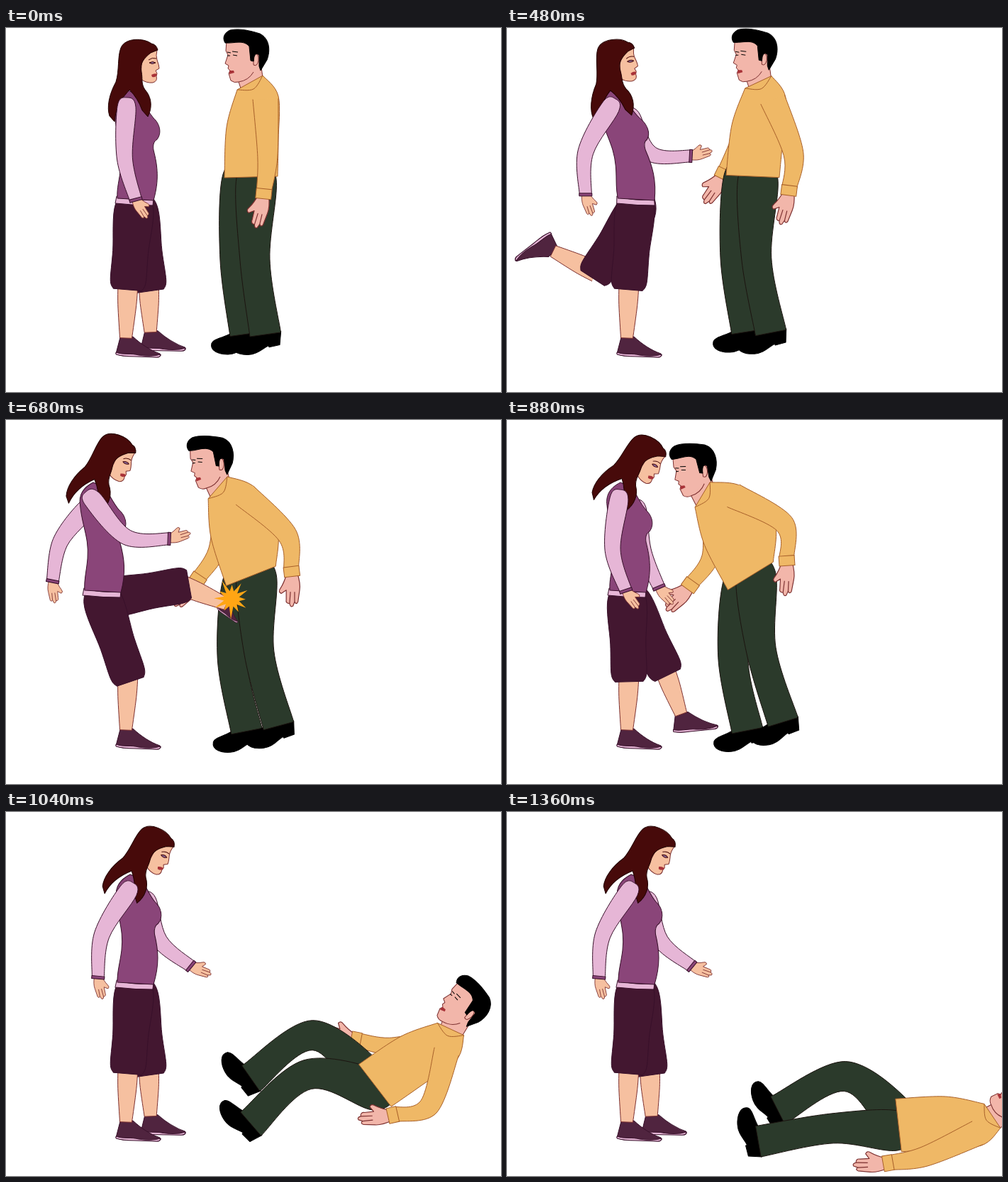
Animation of 698x513 px, one loop 1.56 s. Source, as an HTML page with a canvas:

```html
<!DOCTYPE html>
<html lang="en">
<head>
<meta charset="utf-8">
<title>Kick</title>
<style>
html, body { margin: 0; width: 100%; height: 100%; overflow: hidden; background: #fff; }
canvas { display: block; width: 698px; height: 513px; }
</style>
</head>
<body>
<canvas id="stage" width="698" height="513"></canvas>
<script>
const ctx = document.getElementById('stage').getContext('2d');
const LOOP = 1560, STEP = 40;

const C = {
  hair: '#470a0a', wSkin: '#f6c0a0', top: '#8a4579', sleeve: '#e6b6d6', shorts: '#431730',
  wShoe: '#50243f', wLine: '#38102a', skinLine: '#7c3030',
  mSkin: '#f2b6aa', sweater: '#efb866', seam: '#a8602a', trousers: '#2b3a2b', mLine: '#1c1410',
  black: '#000', lips: '#a83238', star: '#ffa514'
};

// Angles are in degrees, clockwise from the right, and may pass 180.
const WOMAN = {
  stand: { shift: 0, lean: 0, tilt: 0, twist: 13, near: [92, 75], far: [85, 93], leg: [82, 88], foot: [25, 1] },
  recoil: { shift: 0, lean: -.18, tilt: -6, twist: 28, near: [119, 90], far: [61, 3], leg: [123, 206], foot: [166, 1] },
  kick: { shift: -46, lean: -.02, tilt: 22, twist: -8, near: [48, 2], far: [128, 101], leg: [-10, 23], foot: [58, .55] },
  step: { shift: -12, lean: 0, tilt: 28, twist: 25, near: [97, 72], far: [81, 67], leg: [64, 70], foot: [18, 1] },
  fall: { shift: 0, lean: .02, tilt: 25, twist: 26, near: [121, 95], far: [72, 39], leg: [82, 88], foot: [25, 1] }
};
WOMAN.rest = WOMAN.fall;

const MAN = {
  stand: { hip: [345, 210], lean: 0, tilt: 0, near: [88, 96], far: [90, 90], nearLeg: [91, 82], farLeg: [95, 82] },
  recoil: { hip: [346, 209], lean: 4, tilt: 0, near: [69, 97], far: [112, 116], nearLeg: [91, 79], farLeg: [96, 81] },
  kick: { hip: [345, 220], lean: -20, tilt: -6, near: [43, 83], far: [99, 124], nearLeg: [88, 75], farLeg: [98, 79] },
  step: { hip: [343, 220], lean: -30, tilt: -9, near: [29, 86], far: [92, 126], nearLeg: [86, 73], farLeg: [98, 79] },
  fall: { hip: [520, 385], lean: 54, tilt: 39, near: [108, 167], far: [172, 191], nearLeg: [193, 139], farLeg: [218, 145] },
  rest: { hip: [552, 441], lean: 85, tilt: 80, near: [156, 170], far: [170, 180], nearLeg: [182, 170], farLeg: [218, 153] }
};

const linear = u => u;
const easeIn = u => u ** 1.4;
const easeOut = u => 1 - (1 - u) ** 2.2;
// Time of arrival, pose, and the easing that leads to it.
const TIMELINE = [
  [120, 'stand', linear], [480, 'recoil', easeOut], [680, 'kick', easeIn],
  [880, 'step', linear], [1040, 'fall', linear], [1360, 'rest', easeOut]
];

const path = d => new Path2D(d);
const HAND = path('M-3-6C6-9 12-10 18-9L32-7Q36-5 32-3L37-1Q39 2 34 3Q34 8 29 7L18 7L22 13Q20 17 16 14C10 10 4 8-3 6Z');
const FINGERS = path('M20-3L32-3M20 2L34 3');
const W_SHOE = path('M-8-1L-14 22Q-5 27 12 25L46 27Q51 25 48 22C34 17 22 9 10-2Z');
const W_SOLE = path('M-14 20C-4 24 8 21 18 24Q36 27 49 23Q49 28 40 27L12 26Q-4 26-14 23Z');
const M_SHOE = path('M-18-3C-28 4-45 5-48 12C-51 23-38 28-25 28C-12 28-5 20 4 16L5 18L20 15L22-4Z');
const W_TOP = path('M172 88C158 95 151 105 153 120C155 150 165 165 162 195C160 215 156 225 157 240L208 243C216 215 214 195 208 172C207 165 208 160 213 157C220 148 217 135 208 127C200 118 195 105 188 95Z');
const W_HEM = path('M156 237Q182 245 208 241L207 250Q180 250 154 247Z');

const WOMAN_HEAD = [
  [path('M192 36L213 31Q211 39 213 45Q216 53 216 57L211 60L213 64L212 68Q214 75 207 77Q198 78 190 72Z'), C.wSkin, C.skinLine],
  [path('M205 22C195 14 168 13 162 28C157 40 160 60 155 76C145 94 142 112 146 124L153 132Q154 108 174 87Q186 99 192 116L200 125C207 111 205 97 196 87C190 78 193 72 191 62C188 50 195 42 204 35L214 31Q212 23 205 22Z'), C.hair, '#200000'],
  [path('M201 45Q206 41 212 43'), null, C.hair],
  [path('M202 49Q207 46 211 49Q206 52 202 49Z'), '#8a6a9c', C.hair],
  [path('M205 66Q210 63 213 65Q212 70 206 69Z'), C.lips, null]
];
const MAN_HEAD = [
  [path('M311 18L310 32L313 38L309 50L314 53L313 57L316 60L314 64L317 74Q322 78 328 76L335 97L365 92L358 40L344 15Z'), C.mSkin, C.skinLine],
  [path('M328 76Q342 74 349 62'), null, C.skinLine],
  [path('M349 37Q357 34 356 46Q354 55 349 52Z'), C.mSkin, C.skinLine],
  [path('M309 21C304 13 309 6 316 3C330 0 345 4 358 8C372 15 373 32 368 45L359 60L357 54L357 38Q350 32 349 47L345 46L343 26C335 16 322 22 309 21Z'), C.black, C.black],
  [path('M312 34L317 35M319 33L327 34M312 39L316 39M320 38L326 39'), null, C.black],
  [path('M315 60L321 60L322 63L315 65Z'), C.lips, null]
];

const rad = deg => deg * Math.PI / 180;
const polar = ([x, y], len, deg) => [x + len * Math.cos(rad(deg)), y + len * Math.sin(rad(deg))];
const along = (a, b, u) => [a[0] + (b[0] - a[0]) * u, a[1] + (b[1] - a[1]) * u];

// Blends numbers, or every entry of two poses of the same form.
function mix(a, b, u) {
  if (typeof a === 'number') return a + (b - a) * u;
  if (Array.isArray(a)) return a.map((v, i) => mix(v, b[i], u));
  return Object.fromEntries(Object.keys(a).map(k => [k, mix(a[k], b[k], u)]));
}

function poseAt(poses, t) {
  const next = TIMELINE.findIndex(key => key[0] > t);
  if (next === 0) return poses.stand;
  if (next < 0) return poses.rest;
  const [from, a] = TIMELINE[next - 1], [to, b, ease] = TIMELINE[next];
  return mix(poses[a], poses[b], ease((t - from) / (to - from)));
}

function paint(shape, fill, line) {
  if (fill) { ctx.fillStyle = fill; ctx.fill(shape); }
  if (line) { ctx.strokeStyle = line; ctx.stroke(shape); }
}

// Smooth runs of points, joined by straight lines with sharp corners.
function outline(runs, closed) {
  const p = new Path2D();
  for (const run of runs) {
    const get = i => run[Math.max(0, Math.min(run.length - 1, i))];
    p.lineTo(...run[0]);
    for (let i = 0; i < run.length - 1; i++) {
      const [a, b, c, d] = [get(i - 1), get(i), get(i + 1), get(i + 2)];
      p.bezierCurveTo(b[0] + (c[0] - a[0]) / 6, b[1] + (c[1] - a[1]) / 6,
        c[0] - (d[0] - b[0]) / 6, c[1] - (d[1] - b[1]) / 6, c[0], c[1]);
    }
  }
  if (closed) p.closePath();
  return p;
}

function limb(joints, widths, fill, line, cap = true) {
  const left = [], right = [];
  let top;
  joints.forEach(([x, y], i) => {
    const a = joints[i - 1] || joints[i], b = joints[i + 1] || joints[i];
    const dx = b[0] - a[0], dy = b[1] - a[1], k = widths[i] / Math.hypot(dx, dy);
    left.push([x + dy * k, y - dx * k]);
    right.unshift([x - dy * k, y + dx * k]);
    if (!i) top = [x - dx * k, y - dy * k];
  });
  paint(cap ? outline([[...right, top, ...left]], true) : outline([left, right]), fill, line);
}

function place([x, y], deg, draw, sx = 1, sy = 1) {
  ctx.save();
  ctx.translate(x, y);
  ctx.rotate(rad(deg));
  ctx.scale(sx, sy);
  draw();
  ctx.restore();
}

function head(parts, neck, deg, px, py) {
  place(neck, deg, () => {
    ctx.translate(-px, -py);
    for (const part of parts) paint(...part);
  });
}

function arm(shoulder, [upper, fore], look) {
  const elbow = polar(shoulder, look.upper, upper), wrist = polar(elbow, look.fore, fore);
  const cuff = new Path2D();
  cuff.rect(-3, -look.cuffHalf, look.cuff, look.cuffHalf * 2);
  place(polar(wrist, look.cuff - 5, fore), fore + look.bend, () => {
    paint(HAND, look.skin, C.skinLine);
    paint(FINGERS, null, C.skinLine);
  }, look.hand, look.hand * Math.sign(look.bend));
  limb([shoulder, elbow, wrist], look.widths, look.fill, look.line, look.cap);
  place(wrist, fore, () => paint(cuff, look.cuffFill, look.line));
}

const W_ARM = {
  upper: 73, fore: 61, widths: [13, 11, 8.5], cap: true, fill: C.sleeve, line: C.wLine,
  cuff: 4, cuffHalf: 9, cuffFill: C.top, skin: C.wSkin, hand: .82, bend: -16
};
const W_FAR_ARM = { ...W_ARM, upper: 60, fore: 57 };
const M_ARM = {
  upper: 82, fore: 48, widths: [18, 14, 10.5], cap: false, fill: C.sweater, line: C.seam,
  cuff: 14, cuffHalf: 11, cuffFill: C.sweater, skin: C.mSkin, hand: 1.18, bend: 7
};
const M_FAR_ARM = { ...M_ARM, upper: 58, fore: 44, widths: [14, 12, 10] };

function womanLeg(hip, knee, ankle, [turn, length]) {
  place(ankle, turn - 26, () => {
    paint(W_SHOE, C.wShoe, C.wLine);
    paint(W_SOLE, C.sleeve, C.wLine);
  }, length, length);
  limb([knee, along(knee, ankle, .4), ankle], [14, 13, 8.5], C.wSkin, C.skinLine, false);
  const thigh = [0, .6, .98, 1.09].map(u => along(hip, knee, u));
  limb(thigh, [26.5, 25, 25, 20], C.shorts, C.wLine);
}

function drawWoman(t) {
  const p = poseAt(WOMAN, t);
  const sway = (x, y) => [x + p.shift + p.lean * (243 - y), y];
  const shoulder = sway(170, 111);

  arm([shoulder[0] + p.twist, 125], p.far, W_FAR_ARM);
  const hip = [186 + p.shift, 252], knee = polar(hip, 110, p.leg[0]);
  womanLeg(hip, knee, polar(knee, 68, p.leg[1]), p.foot);
  womanLeg([181 + p.shift, 250], [172, 359], [169, 437], [26, 1]);

  ctx.save();
  ctx.transform(1, 0, -p.lean, 1, p.shift + p.lean * 243, 0);
  paint(W_HEM, C.sleeve, C.wLine);
  paint(W_TOP, C.top, C.wLine);
  ctx.restore();
  head(WOMAN_HEAD, sway(183, 85), p.tilt, 183, 85);
  arm(shoulder, p.near, W_ARM);
}

function drawMan(t) {
  const p = poseAt(MAN, t);
  const stoop = Math.max(0, -p.lean);
  const cos = Math.cos(rad(p.lean)), sin = Math.sin(rad(p.lean));
  const at = (x, y) => [p.hip[0] + x * cos - y * sin, p.hip[1] + x * sin + y * cos];
  const thigh = 115 - .27 * Math.abs(p.lean);

  const leg = (hip, [a, b]) => {
    const knee = polar(hip, thigh, a), ankle = polar(knee, 106, b);
    place(ankle, b - 83, () => paint(M_SHOE, C.black, C.black));
    limb([hip, knee, ankle], [28, 21, 22], C.trousers, C.mLine);
  };

  arm(at(-5, -100), p.far, M_FAR_ARM);
  leg(at(-12, 2), p.farLeg);
  leg(at(8, 2), p.nearLeg);
  head(MAN_HEAD, at(-1, -133), p.tilt, 344, 77);

  // The back stretches as he stoops.
  const front = [at(-37, 1), at(-34, -70), at(-19, -123)];
  const back = [at(17, -143), at(39 + stoop / 2, -114), at(39 + stoop, -52), at(38, -1)];
  paint(outline([front, back], true), C.sweater, C.seam);
  paint(outline([[front[2], at(4, -124), back[0]]]), null, C.seam);
  arm(at(21 + stoop / 2, -110), p.near, M_ARM);
}

function drawStar() {
  const p = new Path2D();
  for (let i = 0; i < 24; i++) {
    const r = i % 2 ? 11 : 24 + 5 * Math.sin(i * 1.9);
    p.lineTo(...polar([318, 252], r, i * 15 + 32));
  }
  p.closePath();
  paint(p, C.star, null);
}

function draw(t) {
  ctx.fillStyle = '#fff';
  ctx.fillRect(0, 0, 698, 513);
  ctx.lineWidth = 1;
  ctx.lineJoin = 'round';
  drawMan(t);
  drawWoman(t);
  if (t >= 680 && t < 760) drawStar();
}

const start = performance.now();
function tick() {
  const t = (performance.now() - start) % LOOP;
  draw(Math.floor(t / STEP) * STEP);
  requestAnimationFrame(tick);
}
tick();
</script>
</body>
</html>
```
